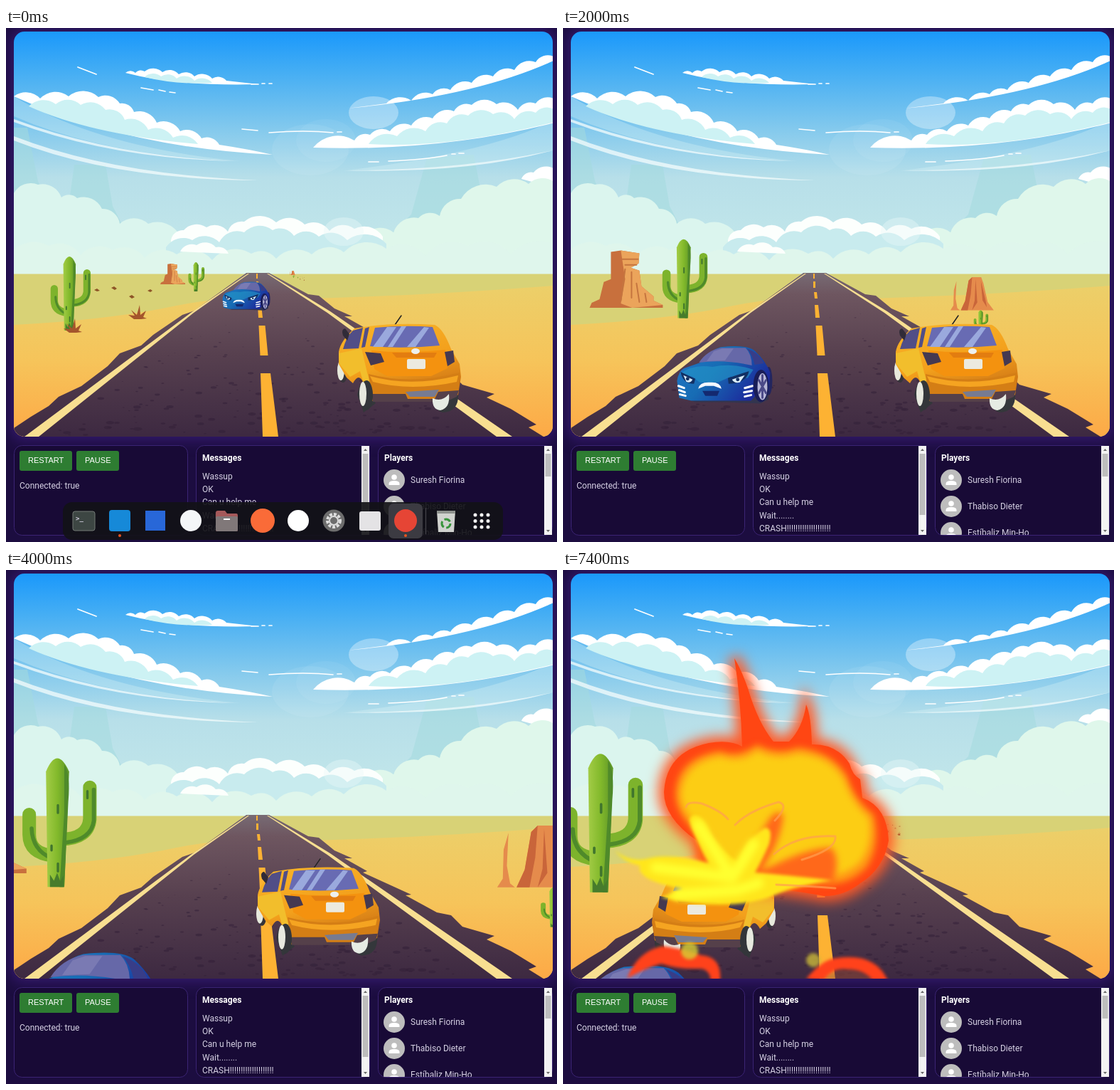
Animation, 775 px wide and 722 px high, one loop 7.5 s. Source, as an HTML page:

```html
<!DOCTYPE html>
<html lang="en">
<head>
<meta charset="utf-8">
<title>Desert drive</title>
<style>
html, body { margin: 0; height: 100%; overflow: hidden; background: #1c0d40; }
svg { display: block; width: 775px; height: 722px; }
text { font: 12px Roboto, sans-serif; fill: #d5d0e3; white-space: pre; }
.head { font-weight: 700; fill: #fff; }
.btn { font: 11px "Liberation Sans", Arial, sans-serif; fill: #fff; }
.panel { fill: #180a36; stroke: #3b2474; }
.line { fill: none; stroke-linecap: round; stroke-linejoin: round; }
.blur2 { filter: blur(2px); }
.blur5 { filter: blur(5px); }
.blur9 { filter: blur(9px); }
</style>
</head>
<body>
<svg viewBox="0 0 775 722">
<defs>
  <linearGradient id="sky" x2="0" y2="1"><stop stop-color="#1a98fb"/><stop offset=".16" stop-color="#43adf4"/><stop offset=".4" stop-color="#83c9ed"/><stop offset=".6" stop-color="#b7dfe9"/><stop offset="1" stop-color="#c6e9ea"/></linearGradient>
  <linearGradient id="sand" x2="0" y2="1"><stop stop-color="#eccf69"/><stop offset=".5" stop-color="#f6c45a"/><stop offset="1" stop-color="#fda946"/></linearGradient>
  <linearGradient id="road" x2="0" y2="1"><stop stop-color="#776b74"/><stop offset=".13" stop-color="#6e5660"/><stop offset=".5" stop-color="#57404f"/><stop offset="1" stop-color="#3d2941"/></linearGradient>
  <linearGradient id="green"><stop stop-color="#a3cc46"/><stop offset=".5" stop-color="#82b92b"/><stop offset="1" stop-color="#5c9428"/></linearGradient>
  <linearGradient id="blue" x2="1" y2=".5"><stop stop-color="#2277c8"/><stop offset=".5" stop-color="#176cb4"/><stop offset="1" stop-color="#1c2b9c"/></linearGradient>
  <linearGradient id="gold" x2=".4" y2="1"><stop stop-color="#f8b52a"/><stop offset=".6" stop-color="#f3a01c"/><stop offset="1" stop-color="#cf7616"/></linearGradient>
  <clipPath id="stage"><rect x="11" y="5" width="758" height="569" rx="15"/></clipPath>
  <clipPath id="list"><rect x="268" y="587" width="500" height="125"/></clipPath>

  <g id="cactus">
    <path class="line" d="M84 37V78Q82 103 48 104M8 72V98Q8 122 38 125" stroke="#7db32c" stroke-width="17"/>
    <path class="line" d="M89 40V80Q86 104 54 108M11 90Q12 118 36 128" stroke="#4f8a2a" stroke-width="5"/>
    <path d="M31 165L29 17Q43-17 58 17L52 165z" fill="url(#green)"/>
    <path d="M52 8Q60 20 57 55L52 165H46L52 70z" fill="#4f8a2a"/>
    <path class="line" d="M44 60v10M36 112v6M44 135v10M81 42v9" stroke="#40752d" stroke-width="3"/>
    <path d="M34 165v-16l5 8 4-10 4 11 4-8v15z" fill="#477c2c"/>
  </g>
  <path id="sprout" d="M-5 0L-13-6-4-5-9-13-1-6 3-20 4-6 12-12 8-3 13-1 5 0z" fill="#a4552c"/>
  <path id="pebbles" d="M57-60l4-2 4 3-3 2zM82-48l4-2 4 3-4 2zM108-56l4-2 3 2-3 2zM33-57l4-2 4 3-4 1z" fill="#8e5527"/>
  <path id="fire" d="M142 312Q145 255 205 243Q235 238 252 248Q250 180 241 124Q250 138 260 166Q274 214 296 241H318Q337 222 342 189Q349 204 350 245Q385 244 403 272Q407 288 418 294L421 320Q456 333 458 380Q451 420 418 440Q396 458 367 458Q300 445 205 441L188 380Q142 348 142 312z"/>
</defs>

<rect x="6" y="0" width="768" height="580" rx="18" fill="#32186a" class="blur9"/>
<g clip-path="url(#stage)">
  <rect x="11" y="5" width="758" height="341" fill="url(#sky)"/>
  <path d="M96 192H140L150 250 175 300H70L88 250zM11 140H30L45 215 60 250H11zM592 182 658 178 668 230 690 300H530L570 262z" fill="#a5dade" opacity=".55"/>
  <g fill="#fff">
    <ellipse cx="517" cy="119" rx="35" ry="23" opacity=".33"/>
    <ellipse cx="428" cy="171" rx="54" ry="36" opacity=".07"/>
    <ellipse cx="450" cy="158" rx="42" ry="30" opacity=".05"/>
  </g>
  <path d="M11 96Q130 168 330 187Q140 180 11 124zM769 130Q680 175 480 200Q660 198 769 172z" fill="#def4f4" opacity=".3"/>
  <path d="M11 128Q150 180 322 187Q150 184 11 132zM11 152Q150 206 355 214Q150 213 11 158zM475 200Q640 200 769 172Q650 205 475 200z" fill="#f4fcfc" opacity=".75"/>

  <path data-puff="11,96 48,99 88,96 130,97 160,106 180,118 212,133 245,145 275,155 300,164" data-end="Q340 170 375 178Q170 168 11 96" fill="#fff"/>
  <path data-puff="32,110 70,107 105,108 140,115 167,129 200,143 235,154 270,163" data-end="Q120 150 32 110" fill="#cdf2f4"/>
  <path data-puff="168,63 182,63 195,61 220,62 243,65 265,68 290,71 310,74" data-end="L355 79Q240 82 168 63" fill="#fff"/>
  <path data-puff="195,69 218,68 240,71 265,74 290,77" data-end="Q240 80 195 69" fill="#cdf2f4"/>
  <path data-puff="535,106 570,102 600,93 625,87 655,77 685,68 715,59 745,48 770,40" data-end="V46Q660 96 480 113L535 106" fill="#fff"/>
  <path data-puff="432,168 490,158 512,150 540,145 570,137 600,127 630,117 655,108 690,107 720,115 745,106 772,100" data-end="V133Q610 174 432 168" fill="#fff"/>
  <path data-puff="510,163 550,152 590,145 620,134 650,123 685,121 715,128 745,119 772,115" data-end="V132Q620 170 510 163" fill="#cdf2f4"/>
  <path class="line" d="M101 55l26 10M190 84l17 3M215 87l9 2M230 90l8 1M345 79h10M360 78h4M370 78h4M332 142l22 2M370 147q50-4 90 0M466 146h6M510 188h14M538 187q50-2 82-8M627 177h5M637 176h7" stroke="#fff" stroke-width="1.700"/>

  <path data-puff="725,212 742,203 772,198" data-end="V225Z" fill="#fff"/>
  <path data-puff="11,232 45,220 78,238 100,239 135,254 160,275 200,275 245,292 300,305" data-end="V346H11z" fill="#dbf5ee"/>
  <path data-puff="470,300 505,290 545,287 580,267 610,264 640,240 690,223 735,219 772,217" data-end="V346H470z" fill="#dff7eb"/>
  <path data-puff="232,298 250,284 282,280 312,286 335,272 380,273 420,276 455,285 490,282 530,293" data-end="V346H232z" fill="#fcfffd"/>
  <path data-puff="225,308 262,298 300,301 335,287 375,284 405,292 440,293 480,298 535,303" data-end="V346H225z" fill="#c8ebee"/>
  <ellipse cx="475" cy="286" rx="28" ry="20" fill="#e8f8f8" opacity=".4"/>
  <path data-puff="5,318 60,306 105,319 150,312 195,323 240,318 290,326 345,317 380,324 430,318 475,315 535,310 590,320 650,306 710,318 780,308" data-end="V346H5z" fill="#dff6ec"/>
  <path data-puff="245,314 268,305 295,308 313,317" data-end="Z" fill="#fcfffc"/>

  <rect x="11" y="345.500" width="758" height="229" fill="#d8d276"/>
  <path d="M11 417Q130 411 220 394Q300 376 354 382Q560 378 769 362V574H11z" fill="url(#sand)"/>
  <path d="M338 344H370L425 374 440 376 462 394 487 405 476 405 508 423 502 425 570 456 562 457 606 481 626 485 642 501 687 514 676 519 710 535 746 557 735 561 756 574H11V562L35 546 60 531 74 518 106 503 143 475 160 457 190 446 207 431 248 403 265 397z" fill="url(#road)"/>
  <g id="specks" fill="#35223a"></g>
  <path d="M340 345h2L264 400 46 574H26L260 400zM367 345h2L456 398 712 574H690L452 400z" fill="#f8df91"/>
  <path d="M352 345h2v7h-2zM352 356h3v9h-3zM353 371h4l1 9h-4zM354 389h5l2 18h-6zM355.500 418h9l4 42h-11zM358 485h14L383 574H361z" fill="#fdb233"/>

  <g id="rockL">
    <path d="M0 80L3 73 14 68 20 44 30 40V2L44 0 70 4 69 18 58 24 70 28 73 50 90 64V70L103 76V80z" fill="#c8703d"/>
    <path d="M44 0L70 4 69 18 58 24 70 28 73 50 90 64V70L103 76 60 80 44 74 50 40z" fill="#eba45b"/>
    <path class="line" d="M46 12h22M50 26l-6 44M59 30v36M66 46l4 26M50 20h16M78 60l2 12" stroke="#c5753f" stroke-width="2"/>
  </g>
  <g id="rockR">
    <path d="M0 77L7 66 8 30 14 9 12 50 16 72 22 77zM24 77L34 55 42 8 50 0H71L76 14 86 58 100 77z" fill="#e58b4c"/>
    <path d="M24 77L34 55 42 8 50 0 47 40 40 77zM58 4l-2 50-6 23 12-18zM70 8l4 46 10 16-3-17z" fill="#c9653a"/>
    <use href="#cactus" transform="translate(54 77) scale(.36 .3)"/>
  </g>
  <use id="cactusL" href="#cactus"/>
  <g id="nearL">
    <use href="#cactus" transform="translate(-28 -104) scale(.606 .63)"/>
    <use href="#sprout" x="3" y="3"/>
    <use href="#pebbles"/>
    <use href="#sprout" transform="translate(94 -16)"/>
  </g>
  <g id="nearR">
    <use href="#cactus" transform="translate(-66 -28) scale(.2 .11)"/>
    <use href="#sprout" transform="translate(-17 15)"/>
    <use href="#sprout" transform="translate(54 33) scale(.75 1.150)"/>
    <use href="#sprout" transform="translate(57 -19) scale(.5 .35)"/>
    <use href="#sprout" transform="translate(31 -7) scale(.5 .4)"/>
    <path d="M-67-30l4-2 3 2-3 2zM-17-31l4-2 3 2-3 2zM12-29l4-2 3 2-3 2z" fill="#8e5527"/>
  </g>

  <g id="blueCar">
    <path d="M8 74L26 80H70L118 82 130 76 128 60 60 60z" fill="#33354f"/>
    <ellipse cx="130" cy="50" rx="5" ry="20" fill="#23265f"/>
    <path d="M0 50Q2 36 10 32L33 24Q44 7 62 2Q98-2 110 7Q126 22 132 38L130 64 112 70 105 78H20L3 74z" fill="url(#blue)"/>
    <path d="M31 24Q42 7 62 3L97 3Q106 12 106 28Q66 19 31 24z" fill="#6668a8"/>
    <path d="M52 8L42 22 68 21 80 4 64 4z" fill="#8788bb" opacity=".6"/>
    <path d="M99 4Q116 10 123 25L110 27Q107 13 99 4z" fill="#383d88"/>
    <path d="M4 40Q22 26 50 30Q80 24 108 34L100 46 76 44 58 52H32L22 44z" fill="#2496c8" opacity=".6"/>
    <path d="M5 37L26 47 24 54Q8 54 5 37zM102 36L72 46 73 54Q98 54 102 36z" fill="#123064"/>
    <path d="M9 42L22 48Q19 54 13 51zM96 42L78 48Q81 54 89 52z" fill="#dceffa"/>
    <circle cx="15" cy="47" r="2.500" fill="#153263"/><circle cx="86" cy="48" r="2.500" fill="#153263"/>
    <path d="M30 61Q32 51 47 52Q61 51 63 61L52 57H40z" fill="#f4f8ff"/>
    <path d="M36 64h24l-3 7H40z" fill="#14296f"/>
    <path class="line" d="M2 57l8 3M3 63l8 3M4 69l8 2M107 57l-11 3M106 64l-11 2M105 70l-9 2" stroke="#fff" stroke-width="3"/>
    <ellipse cx="119" cy="57" rx="11" ry="23" fill="#191d58"/><ellipse cx="121" cy="58" rx="7" ry="19" fill="#b7b7d7"/>
    <path class="line" d="M121 42v32M116 49l10 18M116 67l10-18" stroke="#4b4a88" stroke-width="3"/>
  </g>

  <g id="yellowCar">
    <path class="line" d="M547 417L556 404" stroke="#222" stroke-width="1.500"/>
    <ellipse cx="474" cy="481" rx="7" ry="17" fill="#35343a"/><ellipse cx="471" cy="481" rx="5" ry="14" fill="#e7e9dc"/>
    <path d="M498 500L520 527 503 540 494 515zM600 515L636 512Q638 539 614 540Q600 536 600 515z" fill="#34373b"/>
    <path d="M468 455Q470 440 490 422Q540 413 603 417Q615 422 626 451L638 472 640 490 636 515 620 524H514L502 497Q496 484 488 499L479 491 468 472z" fill="url(#gold)"/>
    <path d="M468 457L500 450 508 484 518 518 505 506 498 482 484 490 469 472z" fill="#f2be2c"/>
    <path d="M474 451Q479 433 488 425L502 421 496 450zM500 449L505 422 511 420 505 448z" fill="#514e87"/>
    <path d="M474 432Q471 423 477 422L483 430 480 439z" fill="#302b38"/>
    <path d="M512 447L519 421Q560 417 600 420L610 446Q560 451 512 447z" fill="#686bb3"/>
    <path d="M536 420h13L530 448H516zM556 419h7L544 448H537zM588 420l7 1-19 27h-12z" fill="#9aa9dd"/>
    <path d="M514 453Q565 458 618 452L621 478 598 489H536L518 479z" fill="#f4920f"/>
    <path d="M543 456h63l-4 7H549z" fill="#e37d10"/>
    <path d="M505 455L527 457 532 469 513 474zM617 455L629 453 631 469 621 475z" fill="#453951"/>
    <ellipse cx="576" cy="454" rx="6" ry="4" fill="#eef0ee"/>
    <rect x="564" y="465" width="26" height="14" rx="2" fill="#eceadf"/>
    <path d="M510 486Q570 502 638 484L636 515 619 524H515z" fill="#d47e15"/>
    <path d="M512 489Q570 505 636 488L634 497Q570 511 516 497z" fill="#f5a421"/>
    <path d="M514 514L562 514 565 521H603L608 511 637 509 634 518 618 525H516z" fill="#55404a"/>
    <path d="M562 511L609 508 603 518H568z" fill="#777b91"/>
    <ellipse cx="507" cy="516" rx="9" ry="21" fill="#33363a"/><ellipse cx="502" cy="514" rx="5" ry="17" fill="#e7e9df"/>
    <path d="M600 520Q613 526 623 514Q625 534 611 537Q599 536 600 520z" fill="#e6ebe3"/>
  </g>

  <g id="blast">
    <g id="boom">
      <use href="#fire" class="blur9" fill="#ff5a28" stroke="#ff5a28" stroke-width="16"/>
      <use href="#fire" fill="#ff4613"/>
      <path class="blur5" d="M158 315Q160 263 221 254Q247 264 273 245Q301 260 330 249Q379 254 400 290Q410 323 437 343Q448 385 428 417Q400 446 362 440L225 430 203 381Q159 350 158 315z" fill="#ff9815"/>
      <path class="blur5" d="M166 315Q170 270 222 262Q250 273 273 254Q300 268 330 258Q375 261 395 295Q406 327 430 348Q437 386 417 411Q390 435 355 428L225 415 210 374Q166 345 166 315z" fill="#fccd14"/>
      <path class="blur5" d="M185 375L212 400 220 440 196 440zM245 450Q268 385 290 350Q302 334 310 345Q304 390 276 425Q340 390 378 390Q392 410 378 442Q310 445 245 460z" fill="#ff681a"/>
      <path class="blur2" d="M73 394Q95 413 125 404Q160 399 205 412Q184 375 178 350Q186 336 202 358Q221 396 246 410Q258 378 284 362Q296 362 290 385Q280 408 270 425Q310 428 379 436Q315 446 291 460Q225 480 138 460L168 448Q103 436 108 415Q86 411 73 394z" fill="#ffe61c"/>
      <path class="line blur5" d="M190 358L238 432 130 418M238 432L268 385M160 456L245 450 275 440" stroke="#ffff30" stroke-width="15"/>
      <path class="line" d="M173 333Q175 324 195 328Q222 338 232 350M242 358Q261 338 303 326Q319 330 298 352M297 399Q328 371 383 374Q386 392 336 407M300 442Q345 444 383 447" stroke="#ffa050" stroke-width="3" opacity=".7"/>
    </g>
    <g class="blur2">
      <path d="M90 574Q104 536 140 528Q175 533 194 541Q224 543 221 577H208Q206 560 192 560Q160 561 138 553Q112 561 90 574z" fill="#ff421b"/>
      <path d="M342 574Q366 546 385 545Q440 537 457 577H436Q424 561 400 561Q380 558 366 577z" fill="#ff421b"/>
      <path d="M366 577Q380 560 400 562Q424 563 436 577z" fill="#9a4a35" opacity=".5"/>
      <circle cx="178" cy="535" r="12" fill="#d7cf35" opacity=".8"/><circle cx="352" cy="548" r="10" fill="#c9b83a" opacity=".8"/>
    </g>
  </g>
</g>

<g class="panel">
  <rect x="11.500" y="586.500" width="244" height="126" rx="11"/>
  <rect x="267.500" y="586.500" width="244" height="126" rx="11"/>
  <rect x="523.500" y="586.500" width="245" height="126" rx="11"/>
</g>
<rect x="19" y="594" width="74" height="28" rx="3" fill="#2e7d32"/><text class="btn" x="31" y="611">RESTART</text>
<rect x="99" y="594" width="60" height="28" rx="3" fill="#2e7d32"/><text class="btn" x="111" y="611">PAUSE</text>
<text x="19" y="647">Connected: true</text>
<g clip-path="url(#list)">
  <text class="head" x="276" y="608">Messages</text>
  <text class="head" x="532" y="608">Players</text>
  <g id="rows"></g>
</g>

<g id="dock">
  <rect x="80" y="666" width="619" height="53" rx="13" fill="#121216" opacity=".91"/>
  <rect x="538" y="668" width="48" height="49" rx="7" fill="#3c3b42"/>
  <path d="M590.500 674v37" stroke="#4b4950"/>
  <rect x="94" y="679" width="31" height="27" rx="3" fill="#3d4643" stroke="#747a76"/>
  <text x="98" y="692" style="font:700 9px 'DejaVu Sans Mono',monospace">&gt;_</text>
  <rect x="145" y="677" width="30" height="30" rx="4" fill="#1689d8"/>
  <rect x="196" y="678" width="28" height="28" fill="#2867d8"/>
  <circle cx="260" cy="692" r="15" fill="#f4f6f8"/>
  <path d="M295 681q0-3 3-3h10l3 4h13q2 0 2 3v20q0 2-2 2h-27q-2 0-2-2z" fill="#a5595a"/><rect x="295" y="686" width="31" height="21" rx="2" fill="#807879"/><path d="M306 690h9" stroke="#fff" stroke-width="2"/>
  <circle cx="361" cy="692" r="17" fill="#fa6b38"/>
  <circle cx="411" cy="692" r="15" fill="#fff"/>
  <circle cx="461" cy="692" r="15.500" fill="#6d6d6d"/><circle cx="461" cy="692" r="9" fill="none" stroke="#ddd" stroke-width="4" stroke-dasharray="4 2"/><circle cx="461" cy="692" r="6" fill="none" stroke="#ddd" stroke-width="2"/>
  <rect x="497" y="679" width="30" height="27" rx="3" fill="#e4e3e5"/>
  <circle cx="562" cy="692" r="16" fill="#e64535"/>
  <path d="M606 678h26l-2 30h-22z" fill="#d0d2ce"/><path d="M606 678h26v4h-26z" fill="#8d918d"/><circle cx="619" cy="696" r="6" fill="none" stroke="#38943c" stroke-width="3" stroke-dasharray="9 3.500"/>
  <path class="line" d="M660 684h19M660 692.500h19M660 701h19" stroke="#f4f4f4" stroke-width="5" stroke-dasharray="0 9"/>
  <circle cx="160" cy="713" r="2" fill="#e95420"/><circle cx="562" cy="713" r="2" fill="#e95420"/>
</g>
</svg>

<script>
const $ = id => document.getElementById(id);
const clamp = v => Math.max(0, Math.min(1, v));
const move = (id, x, y, sx, sy = sx) =>
  $(id).setAttribute('transform', `translate(${x} ${y}) scale(${sx} ${sy})`);
const show = (id, on) => $(id).style.display = on ? '' : 'none';

// Cloud tops: each pair of points is joined by one bulging arc.
for (const p of document.querySelectorAll('[data-puff]')) {
  const pts = p.dataset.puff.split(' ').map(s => s.split(',').map(Number));
  let d = 'M' + pts[0];
  pts.slice(1).forEach(([x, y], i) => {
    const r = Math.hypot(x - pts[i][0], y - pts[i][1]) * .75;
    d += `A${r} ${r} 0 0 1 ${x} ${y}`;
  });
  p.setAttribute('d', d + p.dataset.end);
}

let seed = 7;
const rnd = () => (seed = seed * 16807 % 2147483647) / 2147483647;
let specks = '';
for (let i = 0; i < 190; i++) {
  const y = 400 + 172 * Math.sqrt(rnd()), k = (y - 345) / 229;
  const x = 354 - 290 * k + 600 * k * rnd(), r = (1 + 3.5 * rnd()) * k;
  specks += `<ellipse cx="${x}" cy="${y}" rx="${r * 1.5}" ry="${r * .6}" opacity="${.3 + .4 * k}"/>`;
}
$('specks').innerHTML = specks;

const messages = ['Wassup', 'OK', 'Can u help me', 'Wait........', 'CRASH' + '!'.repeat(20)];
const players = ['Suresh Fiorina', 'Thabiso Dieter', 'Estíbaliz Min-Ho'];
const bar = (x, h) => `<path d="M${x} 587h11v125h-11z" fill="#f3f3f3"/>
  <path d="M${x + 1.5} 598h8v${h}h-8z" fill="#bdbdbd"/>
  <path d="M${x + 3} 594l2.500-3 2.500 3zM${x + 3} 705l2.500 3 2.500-3z" fill="#666"/>`;
$('rows').innerHTML =
  messages.map((m, i) => `<text x="276" y="${633.5 + 18.4 * i}">${m}</text>`).join('') +
  players.map((n, i) => `<g transform="translate(0 ${37 * i})"><circle cx="546" cy="635" r="15" fill="#bdbdbd"/>
    <path d="M538.500 642v-2q0-4 7.500-4t7.500 4v2z" fill="#fff"/><circle cx="546" cy="631" r="3.800" fill="#fff"/>
    <text x="569" y="639">${n}</text></g>`).join('') + bar(500, 86) + bar(757, 32);

// Fits a w0 by h0 drawing into a box given by its centre, top and size.
const fit = (id, cx, top, w, h, w0, h0) => move(id, cx - w / 2, top, w / w0, h / h0);

function draw(now) {
  // The game freezes at the crash.
  const t = Math.min(4400, Math.floor(now % 7500 / 100) * 100);
  fit('cactusL', 268 - .0479 * t, 329 - .0161 * t, 23 + .0206 * t, 41 + .0349 * t, 94, 165);
  fit('rockL', 234.5 - .0728 * t, 331 - .0092 * t, 35 + .034 * t, 29 + .0257 * t, 103, 80);
  fit('rockR', 403 + .0862 * t, 341 + .0045 * t, 8 + .0265 * t, 6 + .0202 * t, 100, 77);
  show('rockR', t < 4300);
  move('nearL', 91 - .189 * t, 425 + .067 * t, 1 + .00064 * t);
  const u = t < 4250 ? t : t - 4250;
  move('nearR', 415 + .3 * u, 352 + .0867 * u, .08 + .00102 * u);
  const w = 67 + .0335 * t;
  fit('blueCar', 338 - .0553 * t, 356 + .0451 * t, w, w * .607, 135, 82);

  // The car swerves into the left lane, mirrored once past the middle.
  const k = clamp((t - 3900) / 300), cx = 553.5 - 342 * k, dir = k < .5 ? 1 : -1;
  move('yellowCar', cx - 553.5 * dir, 5 * k, dir, 1);

  show('blast', t >= 4200);
  const s = .4 + .6 * clamp((t - 4200) / 200);
  move('boom', 260 * (1 - s), 440 * (1 - s), s);

  const hide = clamp((t - 1200) / 300);
  move('dock', 0, 60 * hide, 1);
  show('dock', hide < 1);
}

const start = performance.now();
(function loop() {
  draw(performance.now() - start);
  requestAnimationFrame(loop);
})();
</script>
</body>
</html>
```
